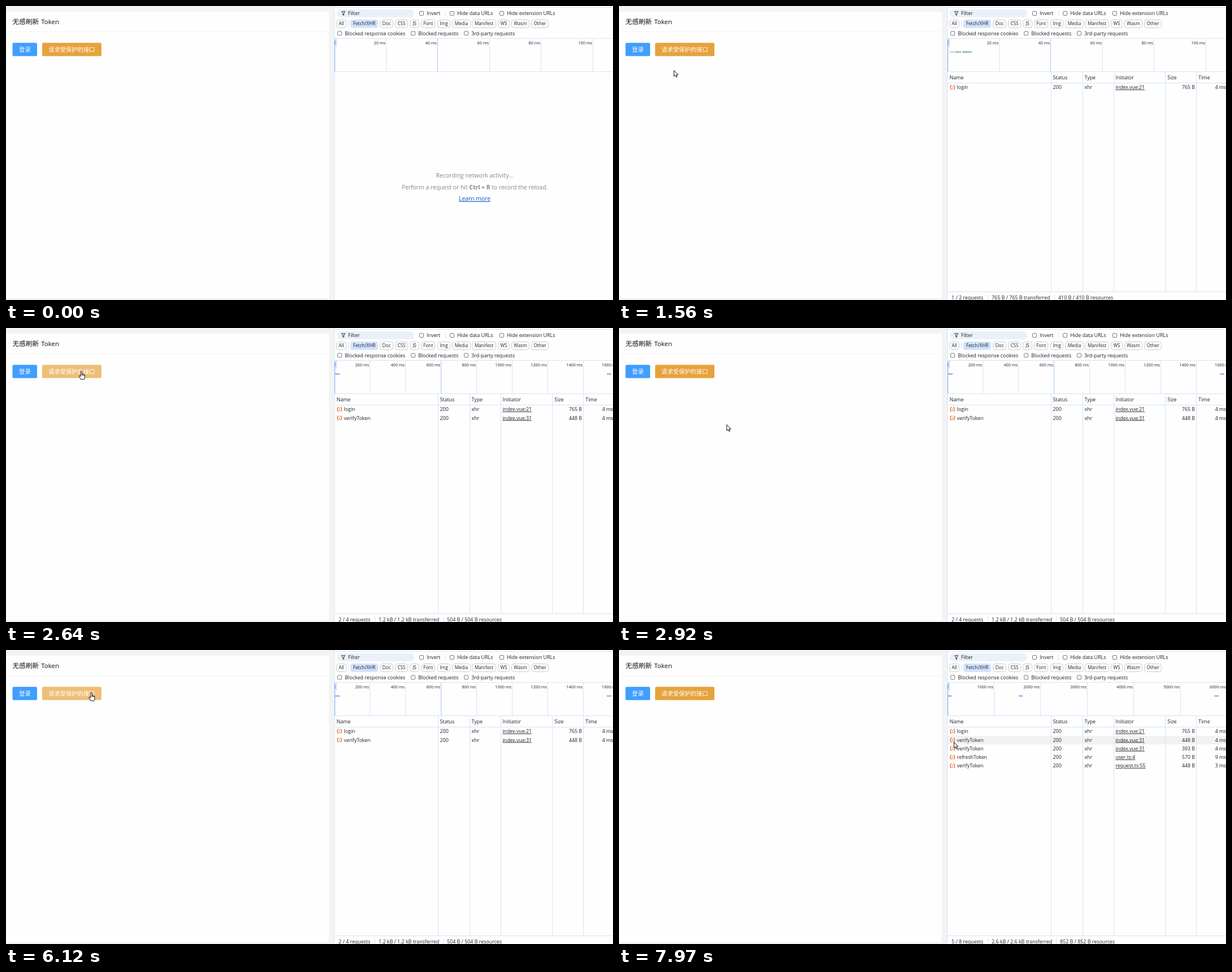
Recreate the animation shown at these times as an HTML page. Size 1075 by 521 pixels, loop 8 s.

```html
<!DOCTYPE html>
<html lang="zh">
<head>
<meta charset="utf-8">
<title>Token refresh demo</title>
<style>
  html, body { margin: 0; width: 100%; height: 100%; overflow: hidden; background: #f3f3f4; }
  svg { display: block; width: 1075px; height: 521px; }
  text { font-family: "Open Sans", "Noto Sans", sans-serif; fill: #202124; white-space: pre; }
  .cjk { font-family: "Noto Sans CJK SC", "Noto Sans CJK", sans-serif; }
</style>
</head>
<body>
<svg id="stage" viewBox="0 0 1075 521" xmlns="http://www.w3.org/2000/svg"></svg>
<script>
const LOOP = 8000;
const RULE = '#d3e3fd';
const stage = document.getElementById('stage');

// Markup helpers
const text = (x, y, s, size = 8.9, extra = '') =>
  `<text x="${x}" y="${y}" font-size="${size}" ${extra}>${s}</text>`;
const rect = (x, y, w, h, fill, extra = '') =>
  `<rect x="${x}" y="${y}" width="${w}" height="${h}" fill="${fill}" ${extra}/>`;
const vline = (x, y1, y2, color = RULE) => rect(x, y1, 1, y2 - y1, color);
const hline = (y, x1 = 582, x2 = 1075, color = RULE) => rect(x1, y, x2 - x1, 1, color);
const END = 'text-anchor="end"';
const MID = 'text-anchor="middle"';

function page() {
  return rect(0, 0, 582, 521, '#f3f3f4') +
    rect(-4, 10, 576, 508, '#fefefe', 'rx="2"') +
    hline(45, 0, 572, '#f2f2f3') +
    text(11.5, 32.2, '无感刷新', 11.7, 'class="cjk" style="fill:#111"') +
    text(62.2, 32.2, 'Token', 11.5, 'style="fill:#111"') +
    rect(11.5, 65.2, 43.6, 23.6, '#409eff', 'rx="2.6" id="login"') +
    text(33.4, 80.7, '登录', 10.4, `class="cjk" style="fill:#fff" ${MID}`) +
    rect(64, 65.2, 105, 23.6, '#e6a23c', 'rx="2.6" id="guard"') +
    text(116.3, 80.7, '请求受保护的接口', 10.3, `class="cjk" style="fill:#fff" ${MID}`);
}

function checkbox(x, y, label, gap) {
  return rect(x + .5, y + .5, 7, 7, '#fff', 'rx="1.3" stroke="#70757a"') +
    text(x + gap, y + 7, label, 8.95);
}

function pill([x, end, label]) {
  const on = label === 'Fetch/XHR';
  const box = on ? rect(x, 24, end - x, 15, '#d3e3fd', 'rx="4"')
    : rect(x + .5, 24.5, end - x - 1, 14, '#fff', 'rx="4" stroke="#c9cbce"');
  return box + text((x + end) / 2, 34.3, label, 8.2, `${MID} font-weight="500"`);
}

function toolbar() {
  const pills = [[585, 603, 'All'], [610, 659, 'Fetch/XHR'], [662, 686, 'Doc'], [689, 712, 'CSS'],
    [715, 732, 'JS'], [735, 760, 'Font'], [764, 787, 'Img'], [790, 823, 'Media'],
    [825, 868, 'Manifest'], [871, 892, 'WS'], [895, 927, 'Wasm'], [930, 961, 'Other']];
  return rect(581, 0, 494, 521, '#fefefe') + vline(581, 0, 521) + hline(2) +
    rect(586, 6, 137, 14, '#ebf1fa', 'rx="7"') +
    '<path d="M594.3 9.8h6.4l-2.4 3.2v3.2h-1.6v-3.2z" fill="none" stroke="#333" stroke-width="1"/>' +
    text(605.7, 16.2, 'Filter', 8.95) +
    checkbox(732, 9, 'Invert', 13) + vline(778, 8, 18) +
    checkbox(786, 9, 'Hide data URLs', 13) +
    checkbox(874, 9, 'Hide extension URLs', 13) +
    pills.map(pill).join('') + vline(606, 25, 38) +
    checkbox(587, 44.5, 'Blocked response cookies', 13) +
    checkbox(717, 44.5, 'Blocked requests', 13) +
    checkbox(811, 44.5, '3rd-party requests', 13) +
    hline(57) + hline(116);
}

function ruler(step, unit, strongAt) {
  let out = '';
  for (let i = 1; 582 + i * step < 1090; i++) {
    const x = Math.floor(582 + i * step);
    out += vline(x, 58, 116, i === strongAt ? '#a8c7fa' : RULE) +
      text(x - 1, 67.8, i * unit + ' ms', 7.25, END);
  }
  return out + vline(582, 58, 116, '#8fb6f6') +
    rect(582, 58, 4, 14, '#cfe0fc', 'rx="1"') + vline(582, 61, 69, '#4f83dc');
}

const bar = (x, w, color = '#7aa5f2') => rect(x, 80.5, w, 2, color);

const ICON = '<path d="M3 .4q-1.6 0-1.6 1.8t-1.2 1.8q1.2 0 1.2 1.8t1.6 1.8M6.4.4q1.6 0 1.6 1.8t1.2 1.8' +
  'q-1.2 0-1.2 1.8t-1.6 1.8M4.7 2v1.2M4.7 4.4v1l-.7 1" fill="none" stroke="#e8642c" stroke-width="1.3"/>';
const requests = [
  ['login', 'index.vue:21', 765, 4],
  ['verifyToken', 'index.vue:31', 448, 4],
  ['verifyToken', 'index.vue:31', 393, 4],
  ['refreshToken', 'user.ts:4', 570, 9],
  ['verifyToken', 'request.ts:55', 448, 3]
];
const ROW = 15.3;

function row([name, origin, size, ms], i) {
  const y = 147.2 + i * ROW;
  return `<g transform="translate(586 ${y - 7.1})">${ICON}</g>` +
    text(598.6, y, name, 8.75) + text(768.5, y, '200', 8.9) + text(824.5, y, 'xhr', 8.75) +
    text(879.3, y, origin, 8.75, 'text-decoration="underline"') +
    text(1020, y, size + ' B', 8.75, END) + text(1075.3, y, ms + ' ms', 8.75, END);
}

function table(count, footer, split) {
  const heads = [[585.5, 'Name'], [768.5, 'Status'], [824.5, 'Type'], [879.5, 'Initiator'],
    [971.3, 'Size'], [1026.3, 'Time']];
  return heads.map(([x, s]) => text(x, 130, s, 8.85)).join('') + hline(136) +
    [765, 821, 876, 967, 1022].map(x => vline(x, 117, 506)).join('') +
    requests.slice(0, count).map(row).join('') + hline(506) +
    text(589, 519.8, footer[0]) + vline(653, 511, 521) +
    text(660, 519.8, footer[1]) + vline(split, 511, 521) + text(split + 7, 519.8, footer[2]);
}

const note = `${MID} style="fill:#80868b"`;
const views = [
  ruler(91.45, 20, 2) +
    text(830, 304.3, 'Recording network activity...', 10.5, note) +
    text(830, 325, 'Perform a request or hit <tspan font-weight="700">Ctrl + R</tspan> to record the reload.', 10.4, note) +
    text(830, 345, 'Learn more', 10.35, `${MID} style="fill:#0b57d0" text-decoration="underline"`),
  ruler(91.45, 20, 2) + bar(586, 8, '#c4c7c5') + bar(595, 4, '#6cbf84') + bar(599, 7) +
    bar(608, 10, '#5dbb78') + bar(618, 7) +
    table(1, ['1 / 2 requests', '765 B / 765 B transferred', '410 B / 410 B resources'], 771),
  ruler(62.9, 200, 3) + bar(583, 8) + bar(1064, 8) +
    table(2, ['2 / 4 requests', '1.2 kB / 1.2 kB transferred', '504 B / 504 B resources'], 774),
  ruler(82.45, 1000) + bar(583, 6) + bar(708, 7) + bar(1054, 8) +
    table(5, ['5 / 8 requests', '2.6 kB / 2.6 kB transferred', '852 B / 852 B resources'], 774)
];

const outline = 'fill="#fff" stroke="#111" stroke-width="1" stroke-linejoin="round"';
stage.innerHTML = page() + toolbar() +
  rect(582, 0, 493, ROW, '#f2f2f2', 'id="band"') +
  views.map(v => `<g class="view">${v}</g>`).join('') +
  `<path id="arrow" ${outline} d="M.3.3V10.8L2.8 8.5 4.3 12.2 6 11.5 4.5 7.9H7.7Z"/>` +
  `<path id="hand" ${outline} d="M-1.2 1Q-1.2 0 0 0T1.2 1V5.2Q2.8 4.5 3 5.8 4.5 5.2 4.7 6.4 6 6 6 7.5V10.5` +
  'Q6 12.5 4.8 14.8H-.8Q-2 12.5-4 9.6-4.4 8.2-3.2 8.1-2.1 8.2-1.2 9.7ZM3 5.8V8M4.7 6.4V8.2M1.2 5.2V8"/>';

const $ = id => document.getElementById(id);
const login = $('login'), guard = $('guard'), band = $('band');
const arrow = $('arrow'), hand = $('hand');
const layers = [...stage.querySelectorAll('.view')];

// Pointer path: time, x, y
const path = [
  [190, 612, 2], [360, 430, 110], [520, 200, 154], [680, 90, 122], [890, 36, 76],
  [1340, 36, 76], [1560, 97, 114], [1620, 97, 114], [2110, 133.5, 76.3],
  [2680, 133.5, 76.3], [2920, 190.5, 171],
  [5499, 190.5, 171], [5500, 187.5, 168.2], [5550, 187.5, 168.2], [6120, 151, 75.2],
  [6800, 151, 75.2], [7060, 282, 85], [7370, 282, 85], [7770, 593, 159.5],
  [7909, 593, 159.5], [7970, 593, 163], [LOOP, 593, 163]
];
const clicks = [1000, 2540, 6730];

function pointer(t) {
  const i = path.findIndex(k => k[0] > t);
  const [t0, x0, y0] = path[i - 1], [t1, x1, y1] = path[i];
  const p = (t - t0) / (t1 - t0);
  return [x0 + (x1 - x0) * p, y0 + (y1 - y0) * p];
}

const show = (el, on) => el.setAttribute('display', on ? 'inline' : 'none');

function draw(t) {
  const visible = t >= path[0][0];
  const [x, y] = visible ? pointer(t) : [-99, -99];
  const inside = (a, b) => x >= a && x <= b && y >= 65 && y <= 89;
  const onLogin = inside(11, 55), onGuard = inside(64, 169);
  const pressed = clicks.some(c => t >= c && t < c + 70);
  const tone = (over, idle, hover, active) => !over ? idle : pressed ? active : hover;
  login.setAttribute('fill', tone(onLogin, '#409eff', '#79bbff', '#337ecc'));
  guard.setAttribute('fill', tone(onGuard, '#e6a23c', '#eebe77', '#b88230'));

  const done = clicks.filter(c => t >= c + 70).length;
  layers.forEach((g, i) => show(g, i === done));

  const hit = Math.floor((y - 136.8) / ROW);
  const over = x >= 582 && hit >= 0 && hit < [0, 1, 2, 5][done];
  show(band, over);
  if (over) band.setAttribute('y', 136.8 + hit * ROW);

  const linked = onLogin || onGuard;
  show(arrow, visible && !linked);
  show(hand, visible && linked);
  (linked ? hand : arrow).setAttribute('transform', `translate(${x} ${y})`);
}

const start = performance.now();
function tick(now) {
  draw(Math.max(0, now - start) % LOOP);
  requestAnimationFrame(tick);
}
draw(0);
requestAnimationFrame(tick);
</script>
</body>
</html>
```
